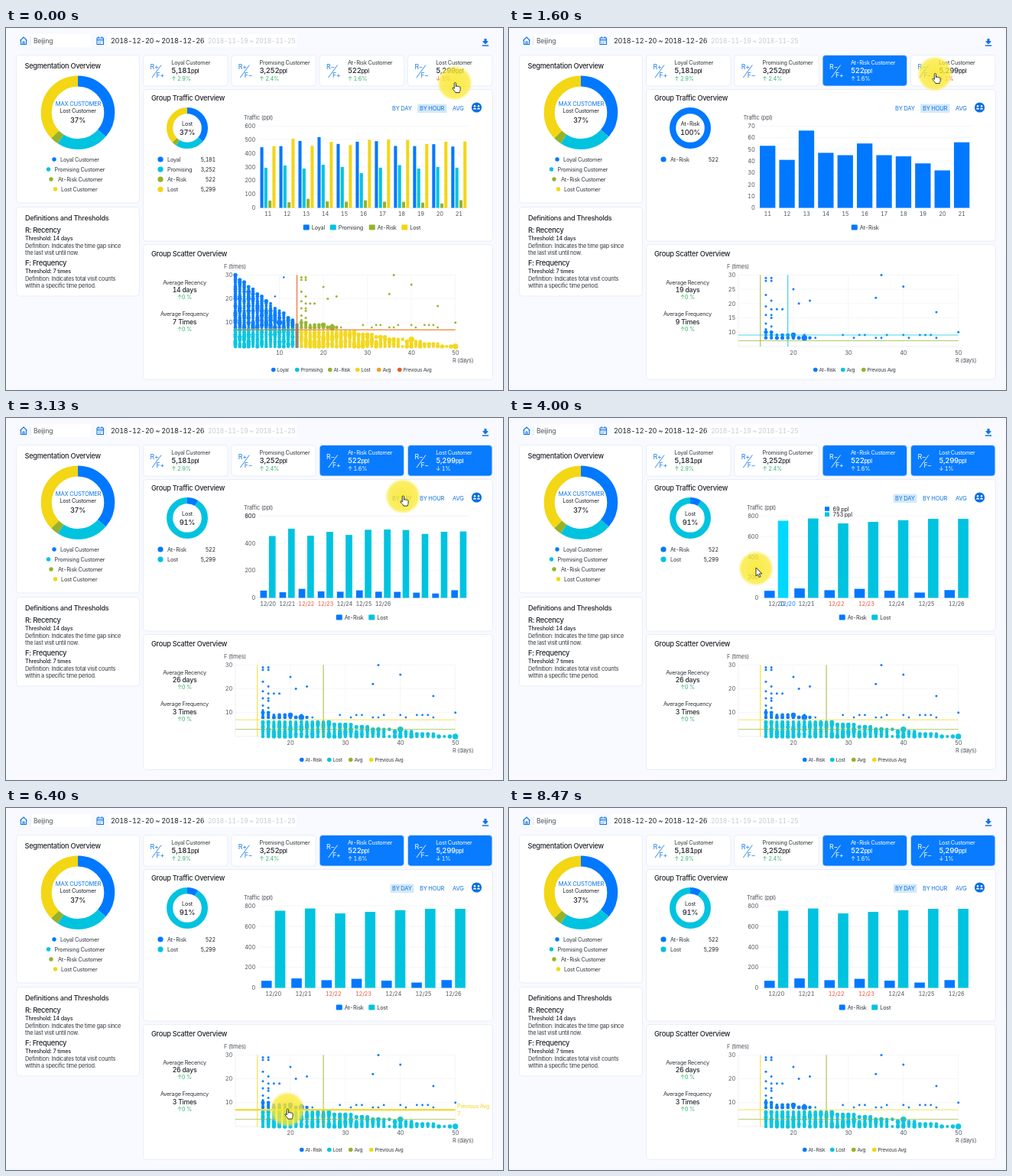
Animation, 650 px wide and 474 px high, one loop 8530 ms. Source, as an HTML page:

```html
<!DOCTYPE html>
<html lang="en">
<head>
<meta charset="utf-8">
<title>Customer segmentation dashboard</title>
<style>
html, body { margin: 0; width: 100%; height: 100%; overflow: hidden; background: #f8faff; }
svg { display: block; width: 650px; height: 474px; }
text {
  font-family: Inter, Roboto, sans-serif; letter-spacing: -.03em;
  font-variant-numeric: tabular-nums; white-space: pre;
}
</style>
</head>
<body>
<svg viewBox="0 0 650 474">
  <defs>
    <radialGradient id="glow">
      <stop offset="0" stop-color="#f8e61c" stop-opacity=".82"/>
      <stop offset=".82" stop-color="#fae934" stop-opacity=".76"/>
      <stop offset="1" stop-color="#fcf070" stop-opacity="0"/>
    </radialGradient>
  </defs>
  <g id="base"></g>
  <g id="cards"></g>
  <g id="traffic"></g>
  <g id="scatter"></g>
  <g id="cursor">
    <circle r="23.5" fill="url(#glow)"/>
    <path id="hand" fill="#fff" stroke="#222" stroke-width=".9" stroke-linejoin="round"
      d="M-.7.6a1.1 1.1 0 0 1 2.2 0V5a1 1 0 0 1 2.1-.2 1 1 0 0 1 1.8.3 1 1 0 0 1 1.7.5V8.6c0 2-.8 2.6-1 4H.9C.5 11-1.9 9.4-2.9 7.4-3.5 6.2-2.1 5.6-1.4 6.5l.7.9Z"/>
    <path id="arrow" fill="#fff" stroke="#222" stroke-width=".9"
      d="M0-1V10l2.5-2.4 1.7 3.9 1.8-.8L4.3 6.9H8Z"/>
  </g>
</svg>
<script>
const LOOP = 8530;
const BLUE = '#0078ff', DARK = '#22252b', SOFT = '#33373e', GREY = '#50545c', GREEN = '#35b56c';
const PALETTE = [BLUE, '#00c3e0', '#95b22a', '#f3d614', '#f0a020', '#ea5a1e'];
const NAMES = ['Loyal', 'Promising', 'At-Risk', 'Lost'];
const TOTALS = [5181, 3252, 522, 5299];
const HOURLY = [
  [444, 452, 490, 518, 468, 484, 488, 453, 452, 466, 449],
  [293, 310, 288, 316, 299, 254, 294, 313, 288, 299, 294],
  [53, 41, 66, 47, 45, 55, 45, 44, 38, 32, 56],
  [452, 506, 454, 483, 460, 498, 500, 497, 468, 484, 486]
];
const DAILY = { 2: [69, 92, 75, 88, 70, 52, 76], 3: [753, 775, 727, 742, 758, 772, 772] };
const hours = Array.from({ length: 11 }, (_, i) => String(11 + i));
const days = Array.from({ length: 7 }, (_, i) => '12/' + (20 + i));

const SCENES = [
  { at: 0, dur: 1, show: [0, 1, 2, 3], data: HOURLY, cats: hours, left: 330, top: 600, step: 100,
    xr: [0, 50], yr: [0, 30], yStep: 10, avg: [14, 7], prev: [14, 7], focus: ['Lost', '37%'] },
  { at: 870, dur: 260, show: [2], data: HOURLY, cats: hours, left: 325.5, top: 70, step: 10,
    xr: [10, 50], yr: [5, 30], yStep: 5, avg: [19, 9], prev: [14, 7], focus: ['At-Risk', '100%'] },
  { at: 2000, dur: 600, show: [2, 3], data: HOURLY, cats: hours, left: 330, top: 600, step: 100,
    xr: [10, 50], yr: [0, 30], yStep: 10, avg: [26, 3], prev: [14, 7], focus: ['Lost', '91%'] },
  { at: 3130, dur: 450, show: [2, 3], data: DAILY, cats: days, left: 330, top: 800, step: 200,
    xr: [10, 50], yr: [0, 30], yStep: 10, avg: [26, 3], prev: [14, 7], focus: ['Lost', '91%'] }
];

// [time, x, y] stops of the pointer
const PATH = [
  [0, 587, 72], [730, 470.5, 58.5], [1270, 470.5, 58.5], [1600, 557, 60], [2650, 557, 60],
  [3070, 519, 102.5], [3700, 519, 102.5], [4000, 323, 197], [4130, 301, 232], [4530, 392, 392],
  [4800, 358, 408], [5420, 358, 408], [5800, 368, 394.5], [6400, 368, 394.5], [7000, 414, 394],
  [8260, 414, 394], [8470, 690, 300]
];

const $ = id => document.getElementById(id);
const mix = (a, b, k) => a + (b - a) * k;
const noise = (x, y) => { const v = Math.sin(x * 12.99 + y * 78.23 + 1) * 43758.55; return v - Math.floor(v); };
const text = (x, y, s, size, fill = DARK, more = '') =>
  `<text x="${x}" y="${y + size * .36}" font-size="${size}" fill="${fill}" ${more}>${s}</text>`;
const MID = 'text-anchor="middle"', END = 'text-anchor="end"', MED = 'font-weight="500"', MID_MED = MID + ' ' + MED;
const rect = (x, y, w, h, fill, more = '') =>
  `<rect x="${x}" y="${y}" width="${Math.max(0, w)}" height="${Math.max(0, h)}" fill="${fill}" ${more}/>`;
const dot = (x, y, r, fill) => `<circle cx="${x}" cy="${y}" r="${r}" fill="${fill}"/>`;
const line = (x1, y1, x2, y2, color, w = 1) =>
  `<path d="M${x1} ${y1}L${x2} ${y2}" stroke="${color}" stroke-width="${w}" fill="none"/>`;
const panel = (x, y, w, h, fill = '#fff') => rect(x, y, w, h, fill, 'rx="4" stroke="#e4eaf4" stroke-width=".8"');
const ring = (cx, cy, r, w, arcs) => arcs.map(([a, b, color]) => b - a < .0005 ? '' :
  `<circle cx="${cx}" cy="${cy}" r="${r}" fill="none" stroke="${color}" stroke-width="${w}" pathLength="1"
   stroke-dasharray="${b - a} 2" stroke-dashoffset="${-a}" transform="rotate(-90 ${cx} ${cy})"/>`).join('');

function shares(scene) {
  const sum = scene.show.reduce((s, i) => s + TOTALS[i], 0);
  let pos = 0;
  return scene.show.map((i, j) => [pos, pos += TOTALS[i] / sum, PALETTE[j]]);
}

function drawBase() {
  const icon = (d, fill = 'none') => `<path d="${d}" fill="${fill}" stroke="#1273e6" stroke-width="1.1" stroke-linejoin="round"/>`;
  const defs = [
    [265, 'R: Recency', 'Threshold: 14 days', 'Definition: Indicates the time gap since', 'the last visit until now.'],
    [308, 'F: Frequency', 'Threshold: 7 times', 'Definition: Indicates total visit counts', 'within a specific time period.']
  ];
  const legend = [[63, 71], [55.5, 63.5], [59, 68], [64.5, 72]];
  return rect(0, 0, 650, 474, '#f8faff') +
    rect(33, 8, 78, 17, '#fff') + rect(133, 8, 247, 17, '#fff') +
    icon('M18.5 16.5L23 12l4.5 4.5M19.5 16v5.5h7V16M22 21.5V18h2v3.5') + line(32, 11, 32, 22, '#d9dfe8', .7) +
    text(36, 16.5, 'Beijing', 8.5, GREY) +
    icon('M119 13h8.5v8.5H119ZM119 15.6h8.5M121 11.3v2.5M125.5 11.3v2.5M121 18h1M123 18h1M125 18h1M121 20h1M123 20h1') +
    text(137, 16.5, '2018-12-20 ~ 2018-12-26', 9.1, DARK) + line(257.5, 12.5, 257.5, 20, '#c4c9d2', .8) +
    text(264, 16.5, '2018-11-19 ~ 2018-11-25', 8.5, '#c6cad2') +
    icon('M626 14.5h2v3h2l-3 3-3-3h2Z', '#1273e6') + line(622.8, 23, 631.2, 23, '#1273e6', 1.5) +
    panel(13.5, 35.5, 161, 193.5) + panel(13.5, 234.5, 161, 116.5) +
    panel(179.5, 80.5, 457, 198.5) + panel(179.5, 283.5, 457, 177) +
    text(24.5, 50, 'Segmentation Overview', 9.2, DARK, MED) +
    ring(94, 110.7, 41.3, 14, shares(SCENES[0])) +
    text(94.5, 99, 'MAX CUSTOMER', 7.6, '#0a74e8', MID) + text(94, 108, 'Lost Customer', 7.3, DARK, MID) +
    text(94, 120.5, '37%', 9.2, DARK, MID_MED) +
    NAMES.map((n, i) => dot(legend[i][0], 172 + 13 * i, 2.7, PALETTE[i]) +
      text(legend[i][1], 172 + 13 * i, n + ' Customer', 7.3, SOFT)).join('') +
    text(25, 249, 'Definitions and Thresholds', 9.1, DARK, MED) +
    defs.map(([y, a, b, c, d]) => text(25, y, a, 9.3, DARK, MED) + text(25, y + 10, b, 7.2, DARK, MED) +
      text(25, y + 20.5, c, 7.35, SOFT) + text(25, y + 29.5, d, 7.35, SOFT)).join('') +
    text(190, 92, 'Group Traffic Overview', 9.2, DARK, MED) +
    text(190, 295.5, 'Group Scatter Overview', 9.2, DARK, MED);
}

function drawCards(t) {
  const pct = ['↑ 2.9%', '↑ 2.4%', '↑ 1.6%', '↓ 1%'];
  const signs = ['++', '+−', '−+', '−−'];
  return NAMES.map((name, i) => {
    const x = 179.5 + 115.3 * i, on = i === 2 ? t >= 870 : i === 3 && t >= 2000;
    const ink = on ? '#fff' : DARK, mark = on ? '#fff' : '#1b7ce8';
    return panel(x, 35.5, 110.5, 40.5, on ? '#087bff' : '#fff') +
      text(x + 9, 50.5, 'R' + signs[i][0], 8.8, mark) + text(x + 17, 61.5, 'F' + signs[i][1], 8.8, mark) +
      line(x + 11.5, 65, x + 23.5, 48.5, mark, .9) +
      text(x + 36.8, 45.2, name + ' Customer', 7.3, on ? '#fff' : SOFT) +
      text(x + 36.8, 55.6, TOTALS[i].toLocaleString('en-US') + '<tspan font-size="7.5">ppl</tspan>', 9.5, ink, MED) +
      text(x + 36.8, 66.7, pct[i], 7.3, on ? '#fff' : i === 3 ? '#ee3b35' : GREEN);
  }).join('');
}

const BASE_Y = 235.5, CHART_H = 107.3, CHART_R = 604.8;
const barY = (v, s) => BASE_Y - v / s.top * CHART_H;
const slot = s => (CHART_R - s.left) / s.cats.length;
const catX = (s, i) => s.left + slot(s) * (i + .5);
function bar(s, series, i) {
  const j = s.show.indexOf(series), n = s.show.length, room = slot(s) * .8;
  if (j < 0 || i >= s.cats.length) return null;
  const w = room / (n + .3 * (n - 1)), y = barY(s.data[series][i], s);
  return [catX(s, i) - room / 2 + j * w * 1.3, y, w, BASE_Y - y];
}

function drawBars(s, old, k, hover) {
  let out = '';
  s.show.forEach((series, j) => {
    const count = Math.max(s.cats.length, old.cats.length);
    for (let i = 0; i < count; i++) {
      const to = bar(s, series, i), from = bar(old, series, i);
      if (!to && !from) continue;
      const end = to || [from[0] + from[2] / 2, from[1], 0, from[3]];
      const start = from || [to[0], BASE_Y, to[2], 0];
      const [x, y, w, h] = end.map((v, n) => mix(start[n], v, k));
      out += rect(x, y, w, h, i === hover && series === 3 ? '#00d8ff' : PALETTE[j]);
    }
  });
  return out;
}

function drawLegend(s) {
  const widths = [17, 33, 24.5, 14];
  let x = 465.5 - (s.show.reduce((a, i) => a + widths[i] + 18, 0) - 7) / 2;
  return s.show.map((i, j) => {
    const item = rect(x, 257.5, 8, 7, PALETTE[j], 'rx="1.2"') + text(x + 11, 261, NAMES[i], 7.3, SOFT);
    x += widths[i] + 18;
    return item;
  }).join('');
}

function drawTraffic(t, s, old, k, px) {
  const left = mix(old.left, s.left, k);
  const hover = t >= 3760 && t < 4080 ? Math.max(0, Math.min(6, Math.floor((px - s.left) / slot(s)))) : -1;
  let out = '';
  const pick = t < 3130 ? 1 : t < 3200 ? -1 : 0;
  [['BY DAY', 505, 502.5, 31], ['BY HOUR', 541, 538, 38.5], ['AVG', 584, 581, 20]].forEach(([n, x, bx, w], i) => {
    if (i === pick) out += rect(bx, 99.5, w, 11.5, '#d3e9fb', 'rx="1.5"');
    out += text(x, 105.5, n, 7.5, '#1273d8');
  });
  out += dot(615.5, 104, 6.6, '#0b6fe0') + dot(613, 102.3, 1.2, '#fff') + dot(618, 102.3, 1.2, '#fff') +
    '<path d="M611 106.5a2 2 0 0 1 4 0ZM616 106.5a2 2 0 0 1 4 0Z" fill="#fff"/>';

  const before = shares(old);
  out += ring(237, 131, 22.9, 8.2, shares(s).map(([a, b, color], j) => {
    const was = before[old.show.indexOf(s.show[j])] || [1, 1];
    return [mix(was[0], a, k), mix(was[1], b, k), color];
  }));
  out += text(237, 125.3, s.focus[0], 7.3, DARK, MID) + text(237, 136.3, s.focus[1], 9.3, DARK, MID_MED);
  s.show.forEach((i, j) => {
    const y = 172 + 13.1 * j;
    out += dot(202, y, 3.6, PALETTE[j]) + text(211, y, NAMES[i], 7.3, SOFT) +
      text(274, y, TOTALS[i].toLocaleString('en-US'), 7.2, DARK, END);
  });

  out += text(left - 19, 117, 'Traffic (ppl)', 7.4, GREY);
  for (let v = 0; v <= s.top; v += s.step) {
    const known = v <= old.top && v % old.step === 0;
    const y = mix(barY(v, known ? old : s), barY(v, s), k);
    out += line(left, y, CHART_R, y, v ? '#f1f3f7' : '#dfe4ec', .7) + text(left - 4, y, v, 7.4, GREY, END);
  }
  out += drawBars(s, old, k, hover);
  s.cats.forEach((c, i) => {
    const weekend = s.cats === days && (i === 2 || i === 3);
    out += text(mix(catX(old, i), catX(s, i), k), 243.5, c, 7.4, weekend ? '#e8563a' : GREY, MID);
  });
  if (hover >= 0) {
    out += text(catX(s, hover) + 14.5, 243.5, s.cats[hover], 7.4, BLUE, MID);
    s.show.forEach((i, j) => {
      out += rect(413, 116.2 + 7.2 * j, 6, 5.6, PALETTE[j]) +
        text(423.5, 119 + 7.2 * j, s.data[i][hover] + ' ppl', 7.3, DARK);
    });
  }
  return out + drawLegend(s);
}

// scatter points per group: [x, y, radius, colour override]
const POINTS = (() => {
  const groups = [[], [], [], []];
  const size = (x, y) => 1.9 + .9 * noise(x, y);
  for (let x = 0; x < 14; x++) {
    for (let y = 8; y <= 30 - 1.45 * x; y++) groups[0].push([x, y, size(x, y)]);
    for (let y = 0; y < 8; y++) groups[1].push([x, y, size(x, y)]);
  }
  groups[0].push([9, 21, 1.3], [11, 29, 1.3], [10, 10, 3.6]);
  for (let y = 0; y < 10; y++) groups[1].push([14, y, 2.3, '#5c8d96']);

  const far = { 15: [29, 28, 23, 19, 16, 13], 16: [29, 28, 21, 18, 16, 15, 12], 17: [18], 18: [18],
    20: [25], 21: [20], 23: [21], 35: [22], 36: [30], 40: [26], 46: [17], 50: [10] };
  for (const x in far) far[x].forEach(y => groups[2].push([+x, y, 1.5]));
  for (let x = 15; x < 24; x++) groups[2].push([x, 8, 2.2 + .8 * noise(x, 8)]);
  for (let x = 15; x < 21; x++) groups[2].push([x, 9, 1.8 + .8 * noise(x, 9)]);
  groups[2].push([15, 10, 2.5], [16, 10, 2.4], [15, 11, 1.6], [22, 8, 3.7], [20, 9, 3.2], [22, 9, 1.7]);
  [24, 31, 35, 36, 41, 46].forEach(x => groups[2].push([x, 8, 1.4]));
  [29, 32, 33, 37, 40, 43, 44, 45].forEach(x => groups[2].push([x, 9, 1.4]));

  for (let x = 15; x <= 50; x++) {
    const top = x < 24 ? 6 : Math.max(0, Math.round(6.6 - (x - 23) * .26));
    for (let y = 0; y <= top; y++)
      if (x < 31 || y === 0 || noise(x, y) > .14) groups[3].push([x, y, size(x, y) + .1]);
  }
  groups[3].push([50, 0, 3.7], [40, 3, 3.7]);
  return groups;
})();

function drawScatter(t, s, old, k) {
  const [x0, x1] = s.xr.map((v, i) => mix(old.xr[i], v, k));
  const [y0, y1] = s.yr.map((v, i) => mix(old.yr[i], v, k));
  const X = v => 300 + (v - x0) / (x1 - x0) * 287.7, Y = v => 417 - (v - y0) / (y1 - y0) * 93.6;
  const n = s.show.length;
  let out = text(285, 312, 'F (times)', 7.4, GREY) + text(584, 435.5, 'R (days)', 7.4, GREY);
  const stats = [[333, 'Recency', s.avg[0] + ' days'], [374.5, 'Frequency', s.avg[1] + ' Times']];
  stats.forEach(([y, name, value]) => {
    out += text(233.5, y, 'Average ' + name, 7.3, SOFT, MID) + text(233.5, y + 10.2, value, 8.7, DARK, MID_MED) +
      text(233.5, y + 19.5, '↑0 %', 7.3, GREEN, MID);
  });
  for (let v = s.xr[0] + 10; v <= 50; v += 10)
    out += line(X(v), 323.4, X(v), 417, '#f1f3f7', .7) + text(X(v), 425, v, 7.4, GREY, MID);
  for (let v = 10; v <= 30; v += s.yStep)
    out += line(300, Y(v), 587.7, Y(v), '#f1f3f7', .7) + text(296, Y(v), v, 7.4, GREY, END);
  out += line(300, 323.4, 300, 417, '#e6eaf0', .7) + line(300, 417, 587.7, 417, '#e6eaf0', .7);

  s.show.forEach((i, j) => {
    out += '<g opacity=".95">' + POINTS[i].map(([x, y, r, c]) =>
      dot(X(x).toFixed(2), Y(y).toFixed(2), r.toFixed(2), c || PALETTE[j])).join('') + '</g>';
  });

  const onPrev = t >= 5600 && t < 6550, onAvg = t >= 6850 && t < 8300;
  const avgColor = PALETTE[n], prevColor = PALETTE[n + 1];
  const cross = ([x, y], color, wx, wy) =>
    line(X(x), 323.4, X(x), 417, color, wx) + line(300, Y(y), 587.7, Y(y), color, wy);
  out += cross(s.avg, avgColor, onAvg ? 2 : .9, .7) + cross(s.prev, prevColor, .9, onPrev ? 2 : .7);
  if (onPrev) out += text(590, 390, 'Previous Avg', 7.3, prevColor) + text(590, 400, s.prev[1], 7.3, prevColor);
  if (onAvg) out += text(X(s.avg[0]), 307, 'Avg', 7.3, avgColor, MID) + text(X(s.avg[0]), 317, s.avg[0], 7.3, avgColor, MID);

  const widths = [16, 28, 21, 13];
  const items = s.show.map((i, j) => [NAMES[i], widths[i], PALETTE[j]]);
  items.push(['Avg', 12, avgColor], ['Previous Avg', 38, prevColor]);
  let x = 452 - (items.reduce((a, it) => a + it[1] + 15, 0) - 7.5) / 2 + 3;
  items.forEach(([name, w, color]) => {
    out += dot(x, 447.5, 2.8, color) + text(x + 4.7, 447.5, name, 6.45, SOFT);
    x += w + 15;
  });
  return out;
}

function pointer(t) {
  let i = PATH.findIndex(p => p[0] > t);
  if (i < 0) i = PATH.length - 1;
  const a = PATH[i - 1], b = PATH[i], p = Math.min(1, (t - a[0]) / (b[0] - a[0]));
  const e = p * p * (3 - 2 * p);
  return [mix(a[1], b[1], e), mix(a[2], b[2], e)];
}

const shown = {};
function put(id, html) {
  if (shown[id] !== html) $(id).innerHTML = shown[id] = html;
}

function render(t) {
  const n = SCENES.filter(s => s.at <= t).length - 1;
  const s = SCENES[n], old = SCENES[Math.max(0, n - 1)];
  const k = 1 - (1 - Math.min(1, (t - s.at) / s.dur)) ** 3;
  const [x, y] = pointer(t);
  put('cards', drawCards(t));
  put('traffic', drawTraffic(t, s, old, k, x));
  put('scatter', drawScatter(t, s, old, k));
  const arrow = t >= 3760 && t < 4560 || t >= 8300;
  $('cursor').setAttribute('transform', `translate(${x} ${y})`);
  $('hand').style.display = arrow ? 'none' : '';
  $('arrow').style.display = arrow ? '' : 'none';
}

put('base', drawBase());
const begin = performance.now();
function tick() {
  render((performance.now() - begin) % LOOP);
  requestAnimationFrame(tick);
}
tick();
</script>
</body>
</html>
```
